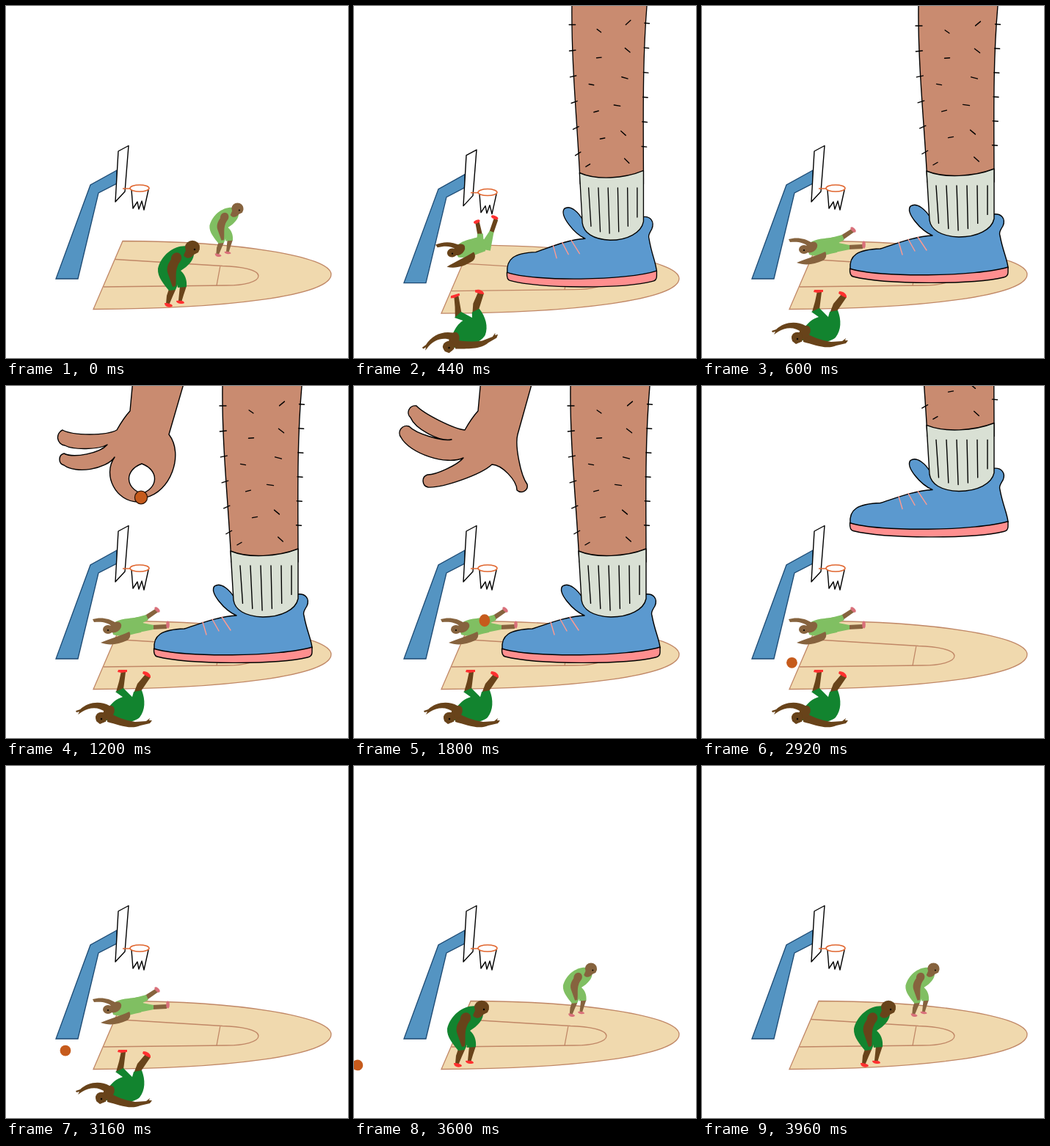
Write an HTML page that moves like this. It is 466 px wide and 480 px high and loops after 4000 ms.

```html
<!DOCTYPE html>
<html lang="en">
<head>
<meta charset="utf-8">
<title>Court stomp</title>
<style>
html, body { margin: 0; width: 100%; height: 100%; overflow: hidden; background: #fff; }
svg { display: block; width: 100%; height: 100%; }
.ink { stroke: #000; stroke-width: 1.4; stroke-linejoin: round; stroke-linecap: round; }
.line { fill: none; }
.wood { stroke: #c08766; stroke-width: 1.3; }
.rim { stroke: #e0662f; stroke-width: 1.5; }
.skin { fill: var(--skin); }
.kit { fill: var(--kit); }
.shoe { fill: var(--shoe); }
#near { --skin: #68431a; --kit: #12842f; --shoe: #ff3030; }
#far { --skin: #86633e; --kit: #80bf62; --shoe: #d9707a; }
#far.flung { --skin: #68431a; --shoe: #ff3030; }
</style>
</head>
<body>
<svg viewBox="0 0 466 480" preserveAspectRatio="none">
  <defs>
    <g id="crouch">
      <path class="skin" d="M222 386L231 387 227 396 222 408 218 406 219 395ZM237 382L246 382 242 394 239 404 235 402Z"/>
      <path class="shoe" d="M216 405C222 405 227 407 227 409C224 412 216 411 216 405ZM232 402C238 401 243 402 243 405C240 407 232 406 232 402Z"/>
      <path class="kit" d="M250 328C232 324 212 338 207 358C206 370 216 380 222 388L231 387 234 380 234 384 246 383C247 374 244 366 238 361C248 355 257 346 256 336Z"/>
      <path class="skin" d="M246 331L242 340C245 345 252 345 256 339L262 336 264 331 258 326Z"/>
      <ellipse class="skin" cx="254" cy="329" rx="10" ry="9.3"/>
      <ellipse class="skin" cx="232" cy="344" rx="7" ry="8" transform="rotate(25 232 344)"/>
      <path class="skin" d="M226 344C220 352 218 358 221 366L227 383 231 382C233 372 229 362 236 350Z"/>
      <circle cx="257" cy="332" r="1.2"/>
    </g>
  </defs>

  <g id="scene">
    <path class="wood" fill="#f0d9ae" d="M159 320.5C316 321 443 341 443 366C443 395 300 413 119 413.5Z"/>
    <path class="wood line" d="M149 345.5L295 354.5C320 355 344 360 344 368C344 376 325 381 300 381L133 383M292 354L287 381"/>
    <path fill="#5494c2" stroke="#1d4a73" stroke-width="1.3" d="M68 372H98L126 255 151 242V224L115 244Z"/>
    <path class="ink" fill="#fff" d="M153 198L167 190.5 162 253 149 267Z"/>
    <path class="ink line" d="M171 251L173 276 179 267 181 277 185 266 188 278 194 251"/>
    <path class="rim" d="M159 249H170"/>
    <ellipse class="rim" fill="#fff" cx="182" cy="248.5" rx="13" ry="4.5"/>
  </g>

  <g id="far">
    <g class="stand"><use href="#crouch" transform="matrix(.81 0 0 .81 109.7 9.5)"/></g>
    <g class="lie">
      <g class="legs">
        <path class="skin" d="M186 315L205 303 209 307 192 319ZM199 326L219 325V331L199 332Z"/>
        <ellipse class="shoe" cx="206" cy="305" rx="4.5" ry="2.3" transform="rotate(45 206 305)"/>
        <ellipse class="shoe" cx="220.5" cy="325.5" rx="2.3" ry="5"/>
        <path class="kit" d="M172 317L191 312 194 319 186 323 201 326V332L176 337Z"/>
      </g>
      <path class="kit" d="M143 327C152 316 166 318 180 315L187 323 184 336C170 339 158 343 146 339Z"/>
      <path class="skin" d="M150 323C140 316 128 315 118 318L120 322C130 321 138 322 145 328ZM168 335C155 341 140 345 129 350C140 354 152 353 165 347C170 344 170 338 168 335Z"/>
      <ellipse class="skin" cx="149" cy="329" rx="9" ry="6.5" transform="rotate(-35 149 329)"/>
      <ellipse class="skin" cx="139" cy="332" rx="7" ry="6"/>
      <circle cx="139" cy="333" r="1.1"/>
    </g>
  </g>

  <g id="near">
    <g class="stand"><use href="#crouch"/></g>
    <g class="lie">
      <path class="skin" d="M150 417L160 414 163 390 157 389 154 403ZM174 419L184 416 197 397 190 393 179 406Z"/>
      <path class="shoe" d="M153 387H165V390L157 391 152 390ZM187 389C193 389 198 393 197 398L192 396 186 392Z"/>
      <path class="kit" d="M134 455C134 443 145 428 159 424L149 417 160 412 172 424 174 417 185 415C190 428 190 442 182 452C172 461 150 460 134 455Z"/>
      <path class="skin" d="M141 436C128 429 112 431 101 441L95 443 96 445 100 444 98 448 104 444C114 438 126 437 136 445Z"/>
      <path class="skin" d="M137 444C150 451 162 456 176 458L191 457 196 453 195 456 199 456 196 460 183 463C170 469 153 462 138 458Z"/>
      <ellipse class="skin" cx="140" cy="445" rx="7" ry="10" transform="rotate(30 140 445)"/>
      <path class="skin" d="M122 450L123 457 128 461 137 457Z"/>
      <ellipse class="skin" cx="130" cy="452" rx="8" ry="7.3"/>
      <circle cx="130" cy="454" r="1.2"/>
    </g>
  </g>

  <g id="leg" class="ink">
    <path fill="#c98b70" d="M296 -80L295 0C294 80 303 160 307 240H398C398 160 396 80 403 0L406 -80Z"/>
    <path id="hairs" class="line"/>
    <path fill="#5b99cf" d="M202 359C200 340 212 332 243 331C265 324 290 314 314 313C298 306 277 282 284 273C293 267 305 278 312 290L396 284C409 282 414 291 410 300C405 308 405 310 406 313C410 335 416 345 417 357C380 371 260 374 202 359Z"/>
    <path fill="#ff8f8f" d="M201.5 358C240 371 375 369 417 356V363Q417 369 411 370C370 380 250 380 206 369Q201 368 201.5 358Z"/>
    <path class="line" stroke="#ff9a90" d="M268 322L273 339M281 318L290 334M294 315L306 333"/>
    <path fill="#d9e0d4" d="M306 225C330 235 370 233 398 222V290C395 305 375 315 350 315C325 314 312 305 310 292Z"/>
    <path id="ribs" class="line"/>
  </g>

  <path id="hand" class="ink" fill="#c98b70"/>
  <ellipse id="ball" fill="#c65b1c" stroke="#2a1205"/>
</svg>

<script>
const $ = s => document.querySelector(s);
const set = (el, attrs) => { for (const k in attrs) el.setAttribute(k, attrs[k]); };
const show = (el, on) => set(el, { visibility: on ? 'visible' : 'hidden' });
const mix = (a, b, k) => a + (b - a) * k;
const part = (t, from, to) => Math.max(0, Math.min(1, (t - from) / (to - from)));
const easeBack = k => 1 + 2.7 * (k - 1) ** 3 + 1.7 * (k - 1) ** 2;

// Motion runs on a 40 ms beat, in slower sections on 80 ms.
function beat(t) {
  const snap = (from, len) => from + Math.floor((t - from) / len) * len;
  if (t < 960) return snap(0, 40);
  if (t < 1320) return Math.min(1200, snap(960, 80));
  if (t < 2640) return snap(1320, 80);
  return t < 3720 ? snap(2640, 40) : snap(3720, 80);
}

function hair(x, y, deg, len = 9) {
  const a = deg * Math.PI / 180, dx = Math.cos(a) * len / 2, dy = Math.sin(a) * len / 2;
  return `M${x - dx} ${y - dy}L${x + dx} ${y + dy}`;
}

function drawLegDetail() {
  // Left and right inner hairs of each row: x and angle.
  const rows = [[334, 35, 376, -40], [334, -5, 375, 38], [323, 10, 371, 15],
    [330, -15, 360, 8], [339, -10, 369, 40], [318, -30, 374, 43]];
  let hairs = '', ribs = '';
  rows.forEach(([lx, la, rx, ra], i) => {
    hairs += hair(lx, 35 + 36 * i, la, 7) + hair(rx, 24 + 37 * i, ra)
      + hair(295.5 + .33 * i * i, 27 + 34.5 * i, -6 * i) + hair(403 - .8 * i, 25 + 33 * i, 5, 7);
    const x = 319 + 14 * i;
    ribs += `M${x} 245L${x + 3.5 - .7 * i} ${306 - 2.4 * (i - 2) ** 2}`;
  });
  set($('#hairs'), { d: hairs });
  set($('#ribs'), { d: ribs });
}

// Each finger: both sides of its tip, the point between it and the next, the sag of both sides.
const pinch = [
  [77, 60, 80, 81, 138, 80, -6, 5],
  [79, 92, 79, 108, 148, 97, -7, 11],
  [180, 158, 186, 147, 185, 106, 20, -18],
  [184, 147, 190, 152, 222, 66, -18, 22]
];
const open = [
  [85, 27, 77, 43, 133, 73, -4, 8],
  [75, 55, 64, 70, 149, 98, -5, 13],
  [100, 121, 101, 138, 188, 107, -4, 6],
  [222, 142, 236, 134, 223, 66, -7, -5]
];

function sagged(x1, y1, x2, y2, sag) {
  const dx = x2 - x1, dy = y2 - y1, c = sag * 4 / 3 / Math.hypot(dx, dy);
  const ctrl = k => `${x1 + dx * k - dy * c} ${y1 + dy * k + dx * c}`;
  return `C${ctrl(.2)} ${ctrl(.8)} ${x2} ${y2}`;
}

function handShape(k) {
  let d = 'M174 -20L169 34Q160 44 151 60', x = 151, y = 60;
  pinch.forEach((finger, i) => {
    const [ax, ay, bx, by, ex, ey, s1, s2] = finger.map((v, n) => mix(v, open[i][n], k));
    const r = Math.hypot(bx - ax, by - ay) * .52;
    d += sagged(x, y, ax, ay, s1) + `A${r} ${r} 0 0 0 ${bx} ${by}` + sagged(bx, by, ex, ey, s2);
    [x, y] = [ex, ey];
  });
  return d + 'L247 -20';
}

// spot: where the player stood, seen from the lying place; jolt: x, y, turn and leg turn on impact.
const players = [
  { el: $('#far'), pivot: [172, 328], spot: [110, -35], jolt: [-6, 0, -8, -60],
    rise: [58, -18], up: 3480, walk: [3440, 3720], from: -75 },
  { el: $('#near'), pivot: [163, 440], spot: [70, -75], jolt: [-6, 3, -17, 0],
    rise: [4, -55], up: 3520, walk: [3720, 3960], from: -80 }
];

function drawPlayer(p, t, kick) {
  const stand = p.el.querySelector('.stand'), lie = p.el.querySelector('.lie');
  const legs = p.el.querySelector('.legs');
  const lying = t > 320 && t < p.up;
  show(stand, !lying);
  show(lie, lying);

  const x = t < p.up ? 0 : p.from * (1 - easeBack(part(t, ...p.walk)));
  set(stand, { transform: `translate(${x} 0)` });

  const falling = t < 3000;
  const upright = falling ? 1 - part(t, 320, 440) : part(t, 3200, p.up);
  const hop = falling ? 30 * Math.sin(Math.PI * upright) : 0;
  const [ox, oy] = falling ? p.spot : p.rise;
  const [jx, jy, turn, legTurn] = p.jolt.map(v => v * kick);
  set(lie, { transform: `translate(${ox * upright + jx} ${oy * upright + jy - hop})
    rotate(${80 * upright + turn} ${p.pivot})` });
  if (legs) set(legs, { transform: `rotate(${legTurn} 183 324)` });
}

function drawBall(t, handY) {
  const held = t < 1320, airy = !held && t < 1980;
  const roll = Math.max(0, t - 2680);
  const drift = part(t, 1280, 2680) ** 1.2;
  const floor = 364 + 2.5 * drift + .045 * roll;
  let y = t < 1280 ? 152 + handY : Math.min(floor, 152 + .004575 * (t - 1280) ** 2);
  for (let start = 1540, len = 440; len > 100; start += len, len *= .6) {
    const k = part(t, start, start + len);
    y -= 4 * k * (1 - k) * len * len * .00024;
  }
  show($('#ball'), t >= 960 && t < 3760);
  set($('#ball'), {
    cx: 184 - 20 * drift - .173 * roll, cy: y,
    rx: held ? 8.6 : 7.4, ry: held ? 8.8 : airy ? 8.5 : 7.4,
    'stroke-width': held ? 1.2 : 0
  });
}

function draw(time) {
  const t = beat(time);

  // The stomp lands at 360 ms; its fading wave drives court, leg and players.
  const u = t - 360;
  const kick = u > 0 && u < 240 ? 1.95 * Math.exp(-u / 120) * Math.sin(u * Math.PI / 160) : 0;
  set($('#scene'), { transform: `translate(0 ${5.6 * kick})` });
  $('#far').classList.toggle('flung', t > 320 && t < 560);
  players.forEach(p => drawPlayer(p, t, kick));

  const high = 330 * Math.max(0, -u / 80) ** 2 + 430 * Math.max(0, (t - 2680) / 380) ** 2;
  const wide = 1 - .053 * kick;
  show($('#leg'), t >= 280 && t < 3120);
  set($('#leg'), {
    transform: `matrix(${wide} 0 0 ${1 + .02 * kick} ${331 * (1 - wide)} ${-2 * kick - high})`
  });

  const handY = -175 * (1 - part(t, 920, 1200)) ** 2 - 82 * Math.max(0, (t - 2360) / 320) ** 2;
  show($('#hand'), t >= 960 && t < 2960);
  set($('#hand'), { d: handShape(part(t, 1240, 1480)), transform: `translate(0 ${handY})` });
  drawBall(t, handY);
}

drawLegDetail();
const start = performance.now();
function loop() {
  draw((performance.now() - start) % 4000);
  requestAnimationFrame(loop);
}
loop();
</script>
</body>
</html>
```
